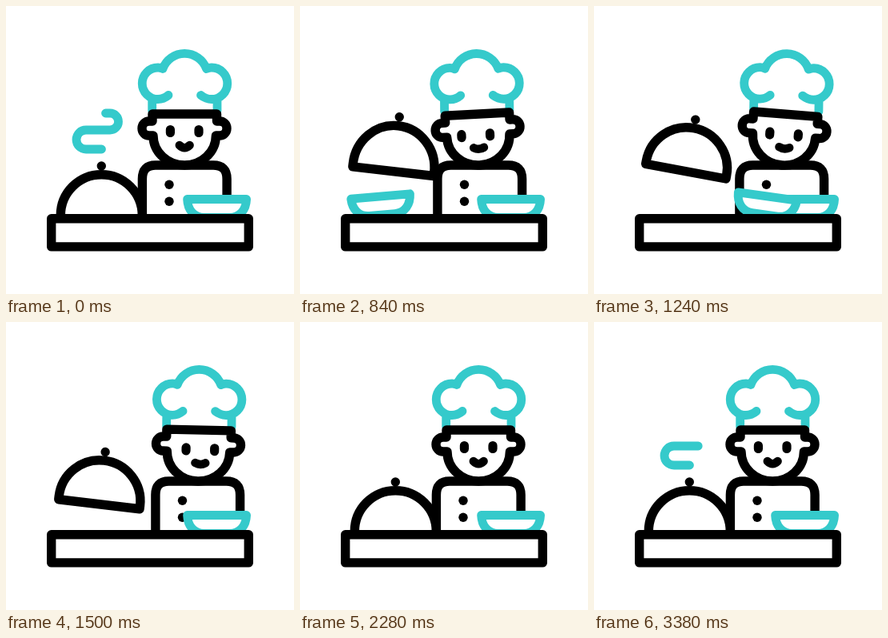
Write an HTML page with a canvas that moves like this. It is 360 px wide and 360 px high and loops after 3400 ms.

```html
<!DOCTYPE html>
<html lang="en">
<head>
<meta charset="utf-8">
<title>Chef at the counter</title>
<style>
html, body { margin: 0; width: 100%; height: 100%; overflow: hidden; background: #fff; }
canvas { display: block; width: 360px; height: 360px; }
</style>
</head>
<body>
<canvas id="stage"></canvas>
<script>
const LOOP = 3400, INK = '#000', TEAL = '#35cacb';
const THICK = 11.4, THIN = 10.8;
const MID = 223.2, NECK = 199, BROW = 130, COUNTER = 265.7;
const canvas = document.getElementById('stage');
const ctx = canvas.getContext('2d');
const dpr = window.devicePixelRatio || 1;
canvas.width = canvas.height = 360 * dpr;

const HEAD = new Path2D('M183 135V144H179a9 9 0 0 0 0 18H184A39.2 37 0 0 0 262.4 162H267a9 9 0 0 0 0-18H263.5V135Z');
const BODY = new Path2D('M170.4 266V216Q170.4 199 187 199H259Q276.1 199 276.1 216V266');
const HAT = new Path2D('M203 111.5Q197 116.5 190 116.5A19.7 19.7 0 0 1 190 77Q193 77 196 78.5A29 29 0 0 1 250.5 78.5Q254 77 257 77A19.7 19.7 0 0 1 257 116.5Q250 116.5 243.5 111.5M182.7 116V131M264 116V131');
const BOWL = new Path2D('M-37 0H37C36.5 13 29 23 16 23H-16C-29 23 -36.5 13 -37 0Z');
const STEAM = new Path2D('M119.5 179H100a12 12 0 0 1 0-24H130a10.5 10.5 0 0 0 0-21H124.5');
const STEAM_LEN = 55 + 22.5 * Math.PI;

// Eased 0 to 1 between two times
function ease(t, from, to) {
  const u = Math.min(1, Math.max(0, (t - from) / (to - from)));
  return u * u * (3 - 2 * u);
}

// Rises from a to b, falls from c to d
const swell = (t, a, b, c, d) => ease(t, a, b) - ease(t, c, d);

function at(x, y, deg, draw) {
  ctx.save();
  ctx.translate(x, y);
  ctx.rotate(deg * Math.PI / 180);
  draw();
  ctx.restore();
}

function shape(path, color, width, fill) {
  if (fill) { ctx.fillStyle = '#fff'; ctx.fill(path); }
  ctx.strokeStyle = color;
  ctx.lineWidth = width;
  ctx.stroke(path);
}

function dot(x, y) {
  ctx.fillStyle = INK;
  ctx.beginPath();
  ctx.arc(x, y, 5.7, 0, 2 * Math.PI);
  ctx.fill();
}

function drawSteam(t) {
  const early = t < LOOP / 2;
  const from = early ? ease(t, 0, 790) : 0;
  const to = early ? 1 : ease(t, 2970, 3620);
  if (to - from < .002) return;
  ctx.save();
  ctx.setLineDash([(to - from) * STEAM_LEN, 999]);
  ctx.lineDashOffset = -from * STEAM_LEN;
  shape(STEAM, TEAL, THIN);
  ctx.restore();
}

function drawFace(t) {
  const look = swell(t, 100, 580, 1760, 2160);
  const follow = swell(t, 840, 1680, 1760, 2160);

  const eyes = new Path2D();
  for (const side of [-1, 1]) {
    const x = MID + 17.8 * side - 3 * look + 6 * follow;
    const y = 154.5 + 5 * look - 2.5 * follow;
    eyes.moveTo(x, y);
    eyes.lineTo(x, y + 4);
  }
  shape(eyes, INK, 11.2);

  const x = MID + 3 * follow, y = 174 + 3 * look - follow;
  const smile = new Path2D();
  smile.moveTo(x - 6.4, y);
  smile.quadraticCurveTo(x, y + 6.5 - 3 * look, x + 6.4, y);
  shape(smile, INK, 10.5);
}

function drawChef(t) {
  const shift = 1.5 * ease(t, 200, 580) + 15 * ease(t, 950, 1425) - 16.5 * ease(t, 1780, 2160);
  const lean = -3 * ease(t, 200, 840) + 7.5 * ease(t, 840, 1240) - 4.5 * ease(t, 1240, 1640);

  at(shift, 0, 0, () => {
    shape(BODY, INK, THICK, true);
    dot(204, 223.3);
    dot(204, 244.3);
  });
  at(MID + shift, NECK, lean, () => {
    // The hat stays nearly upright on the tilting head
    at(0, BROW - NECK, -.8 * lean, () => {
      ctx.translate(-MID, -BROW);
      shape(HAT, TEAL, THIN);
    });
    ctx.translate(-MID, -NECK);
    shape(HEAD, INK, THICK, true);
    drawFace(t);
  });
}

function drawBowl(x, y, rot) {
  at(x, y, rot, () => shape(BOWL, TEAL, THIN, true));
}

function drawBowls(t) {
  const x = 263.6, y = 241.5, arrive = 1460;
  drawBowl(x, y, 0);
  if (t < 500 || t > arrive) return;
  const slide = -18 * ease(t, 580, 840) - 163 * (1 - ease(t, 840, arrive));
  const lift = 3.5 * swell(t, 600, 840, 1240, arrive);
  const tilt = -5 * ease(t, 600, 840) + 13 * ease(t, 840, 1240) - 8 * ease(t, 1240, arrive);
  // The left push is already part of the resting distance
  drawBowl(x + slide + 18, y - lift, tilt);
}

function drawLid(t) {
  const fall = ease(t, 1380, 1680);
  const rise = 59 * (ease(t, 510, 840) - fall);
  const tilt = (6.5 * ease(t, 560, 840) + 4 * ease(t, 840, 1240)) * (1 - fall);
  const tall = 1 + .18 * swell(t, 300, 580, 580, 960) - .105 * swell(t, 1660, 1760, 1760, 1920);
  const r = 51;

  at(119.3 - .43 * tilt, COUNTER - rise, tilt, () => {
    const dome = new Path2D();
    dome.moveTo(-r, 0);
    dome.ellipse(0, -4 * tall, r, r * tall, 0, Math.PI, 2 * Math.PI);
    dome.lineTo(r, 0);
    dome.closePath();
    shape(dome, INK, THICK, true);
    dot(0, -65.7 * tall);
  });
}

function drawCounter() {
  const top = new Path2D();
  top.rect(56.7, COUNTER, 246.6, 35.2);
  shape(top, INK, THICK, true);
}

function frame(now) {
  const t = Math.max(0, now - start) % LOOP;
  ctx.setTransform(dpr, 0, 0, dpr, 0, 0);
  ctx.fillStyle = '#fff';
  ctx.fillRect(0, 0, 360, 360);
  ctx.lineCap = ctx.lineJoin = 'round';
  drawSteam(t);
  drawChef(t);
  drawBowls(t);
  drawLid(t);
  drawCounter();
  requestAnimationFrame(frame);
}

const start = performance.now();
frame(start);
</script>
</body>
</html>
```
